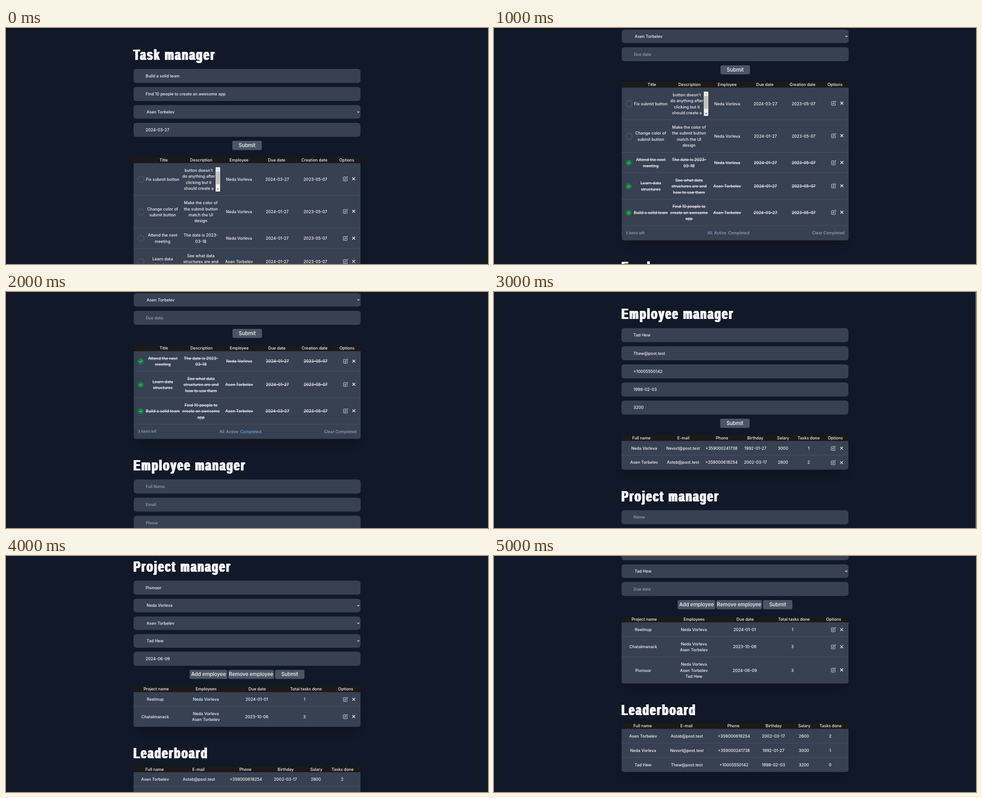
Recreate the animation shown at these times as an HTML page with a canvas. Size 1067 px wide and 525 px high, loop 6000 ms.

```html
<!DOCTYPE html>
<html lang="en">
<head>
<meta charset="utf-8">
<title>Task manager</title>
<style>
  html, body { margin: 0; width: 100%; height: 100%; overflow: hidden; background: #111827; }
  canvas { display: block; }
</style>
</head>
<body>
<canvas id="stage" width="1067" height="525"></canvas>
<script>
const ctx = document.getElementById('stage').getContext('2d');

const LEFT = 282.4, WIDTH = 502.4, LINE = 13.45;
const INK = '#f6f7f9', MUTED = '#9ca3af', PANEL = '#374151', RAISED = '#4b5563';

// ---- Content -------------------------------------------------------------

const NEDA = 'Neda Vorleva', ASEN = 'Asen Torbelev', TAD = 'Tad Hew';
const person = {
  neda: [NEDA, 'Nevorl@post.test', '+359000241738', '1992-01-27', '3000', '1'],
  asen: [ASEN, 'Astob@post.test', '+359000618254', '2002-03-17', '2600', '2'],
  tad: [TAD, 'Thew@post.test', '+10005550142', '1998-02-03', '3200', '0'],
};

const task = (title, text, who, due, extra) =>
  ({ cells: [title, text, who, due, '2023-05-07'], ...extra });
const row = (...cells) => ({ cells });

const openTasks = [
  task('Fix submit button', "button doesn't\ndo anything after\nclicking but it\nshould create a", NEDA, '2024-03-27', { scroll: true }),
  task('Change color of\nsubmit button', 'Make the color of\nthe submit button\nmatch the UI\ndesign', NEDA, '2024-01-27'),
];
const laterTasks = [
  task('Attend the next\nmeeting', 'The date is 2023-\n03-18', NEDA, '2024-01-27'),
  task('Learn data\nstructures', 'See what data\nstructures are and\nhow to use them', ASEN, '2024-01-27'),
  task('Build a solid team', 'Find 10 people to\ncreate an awesome\napp', ASEN, '2024-03-27'),
];
const doneTasks = laterTasks.map(t => ({ ...t, done: true }));

const projects = [
  row('Reelmup', NEDA, '2024-01-01', '1'),
  row('Chatalmanack', `${NEDA}\n${ASEN}`, '2023-10-06', '3'),
  row('Pixmoor', `${NEDA}\n${ASEN}\n${TAD}`, '2024-06-09', '3'),
];

// Columns: label, centre of the label, centre of the cells
const taskColumns = [['Title', 349, 346.7], ['Description', 432.3, 431.3], ['Employee', 515.8, 515.8],
  ['Due date', 599.2, 600.3], ['Creation date', 682.6, 684.9], ['Options', 754.4]];
const employeeColumns = [['Full name', 326.7, 332.7], ['E-mail', 419.5, 418.8], ['Phone', 505.2, 503.8],
  ['Birthday', 578.6, 579], ['Salary', 640.3, 640], ['Tasks done', 696.8, 696.8], ['Options', 756]];
const projectColumns = [['Project name', 332.5, 330.4], ['Employees', 443, 442.5], ['Due date', 556, 555],
  ['Total tasks done', 664, 660.6], ['Options', 752]];
const leaderColumns = [['Full name', 329, 330], ['E-mail', 426, 426.9], ['Phone', 530, 531],
  ['Birthday', 619, 618.6], ['Salary', 687, 686], ['Tasks done', 745, 744.2]];

const input = text => ({ text });
const hint = text => ({ text, hint: true });
const select = text => ({ text, select: true });

const submit = [['Submit', 501, 65.3]];
const projectButtons = [['Add employee', 406.5, 83.6], ['Remove employee', 492, 101.2], ['Submit', 595.6, 65]];

const taskSection = (fields, rows, filter) =>
  ({ title: 'Task manager', fields, buttons: submit, columns: taskColumns, rows, filter, checks: true });
const employeeSection = (fields, rows) =>
  ({ title: 'Employee manager', fields, buttons: submit, columns: employeeColumns, rows });
const projectSection = (fields, rows) =>
  ({ title: 'Project manager', fields, buttons: projectButtons, columns: projectColumns, rows });
const leaderboard = { title: 'Leaderboard', columns: leaderColumns,
  rows: [person.asen, person.neda, person.tad].map(p => row(...p)) };

const emptyTask = [hint('Title'), hint('Description'), select(ASEN), hint('Due date')];
const emptyEmployee = ['Full Name', 'Email', 'Phone', 'Birthday', 'Salary'].map(hint);
const team = [select(NEDA), select(ASEN), select(TAD)];

// top: where the first form starts on the stage
const scenes = [
  { top: 91, edge: 'top', sections: [taskSection(
      [input('Build a solid team'), input('Find 10 people to create an awesome app'), select(ASEN), input('2024-03-27')],
      [...openTasks, ...laterTasks], 'All')] },
  { top: -77.2, shift: .4, edge: 'top', sections: [
      taskSection(emptyTask, [...openTasks, ...doneTasks], 'All'), employeeSection(emptyEmployee, [])] },
  { top: -78.2, shift: .4, sections: [
      taskSection(emptyTask, doneTasks, 'Completed'), employeeSection(emptyEmployee, [])] },
  { top: 80.4, shift: -.3, edge: 'right', sections: [
      employeeSection(person.tad.slice(0, 5).map(input), [row(...person.neda), row(...person.asen)]),
      projectSection([hint('Name')], [])] },
  { top: 54.8, sections: [
      projectSection([input('Pixmoor'), ...team, input('2024-06-09')], projects.slice(0, 2)), leaderboard] },
  { top: -100.4, sections: [
      projectSection([hint('Name'), ...team, hint('Due date')], projects), leaderboard] },
];

// ---- Drawing -------------------------------------------------------------

function box(x, y, w, h, radius, color) {
  ctx.fillStyle = color;
  ctx.beginPath();
  ctx.roundRect(x, y, w, h, radius);
  ctx.fill();
}

function label(text, x, y, { align = 'center', color = INK, size = 8.96, strike = false } = {}) {
  ctx.font = `450 ${size}px Inter, sans-serif`;
  ctx.textAlign = align;
  ctx.fillStyle = color;
  ctx.fillText(text, x, y + size * .364);
  if (strike) {
    const w = ctx.measureText(text).width;
    ctx.fillRect(x - w / 2, y, w, .8);
  }
}

function paragraph(text, x, y, options) {
  const lines = text.split('\n');
  lines.forEach((line, i) => label(line, x, y + (i - (lines.length - 1) / 2) * LINE, options));
}

function strokePath(x, y, path, color = INK, width = 1) {
  ctx.save();
  ctx.translate(x, y);
  ctx.strokeStyle = color;
  ctx.lineWidth = width;
  ctx.stroke(new Path2D(path));
  ctx.restore();
}

// Narrow poster lettering, thickened sideways
function heading(text, baseline) {
  ctx.save();
  ctx.font = 'bold 34px "Liberation Sans", Arial, sans-serif';
  ctx.letterSpacing = '4.35px';
  ctx.textAlign = 'left';
  ctx.fillStyle = INK;
  for (const dx of [-1.4, -.7, 0, .7, 1.4]) {
    ctx.setTransform(.653, 0, 0, 1, 282.3 + dx, baseline);
    ctx.fillText(text, 0, 0);
  }
  ctx.restore();
}

function field({ text, hint, select }, y) {
  const h = select ? 30.2 : 31.2, middle = y + h / 2;
  box(LEFT, y, WIDTH, h, 6, PANEL);
  label(text, select ? 311.2 : 309, middle, { align: 'left', color: hint ? MUTED : INK });
  if (select) strokePath(779.8, middle, 'M-2.3-1.1 0 1.2 2.3-1.1', INK, 1.2);
  return y + h + 9.1;
}

function form({ fields, buttons }, y) {
  for (const f of fields) y = field(f, y);
  const middle = y + 10.1;
  for (const [text, x, w] of buttons) {
    box(x, middle - 10.2, w, 20.4, 3.5, RAISED);
    label(text, x + w / 2, middle, { size: 11.2 });
  }
  return middle + 26.3;
}

function checkbox(done, y) {
  ctx.beginPath();
  ctx.arc(done ? 297.8 : 298.6, y + .2, done ? 6.6 : 7, 0, 7);
  if (done) {
    ctx.fillStyle = '#15803d';
    ctx.fill();
    strokePath(297.8, y, 'M-2.6.2-.8 2 2.7-1.6', INK);
  } else {
    ctx.strokeStyle = '#5f6978';
    ctx.lineWidth = .9;
    ctx.stroke();
  }
}

function scrollbar(y) {
  box(464, y - 27, 10, 54, 0, '#f1f1f1');
  box(464.8, y - 17.5, 8.4, 28.5, 0, '#c1c1c1');
  for (const [dy, dir, color] of [[-21.7, -1, '#a3a3a3'], [21.7, 1, '#505050']]) {
    ctx.fillStyle = color;
    ctx.fill(new Path2D(`M466.8 ${y + dy - dir}h4.4l-2.2 ${2.4 * dir}z`));
  }
}

function options(y) {
  strokePath(751.4, y, 'M.8-3.8H-3.6Q-4.6-3.8-4.6-2.8V3.8Q-4.6 4.8-3.6 4.8H3Q4 4.8 4 3.8V.4M-1.8 2-1.2-.2 3.6-5 5.2-3.4.4 1.4Z', INK, .9);
  strokePath(769.6, y, 'M-3.1-3.1 3.1 3.1M3.1-3.1-3.1 3.1', INK, 1.4);
}

function footer(count, filter, y) {
  label(`${count} items left`, 291.5, y, { align: 'left', color: MUTED, size: 7.84 });
  for (const [text, x] of [['All', 477.5], ['Active', 500.4], ['Completed', 541.4]])
    label(text, x, y, { color: text === filter ? '#60a5fa' : MUTED });
  label('Clear Completed', 775.6, y, { align: 'right', color: MUTED });
}

function table({ columns, rows, filter, checks }, y) {
  const lineCount = r => Math.max(...r.cells.map(c => c.split('\n').length));
  const heights = rows.map(r => lineCount(r) * LINE + 18.5);
  const bodyTop = y + 13;
  const bodyHeight = heights.reduce((a, b) => a + b, filter ? 32.3 : 0);

  ctx.save();
  ctx.shadowColor = 'rgba(0,0,0,.25)';
  ctx.shadowBlur = 22;
  ctx.shadowOffsetY = 15;
  box(LEFT + 9, y + 9, WIDTH - 18, Math.max(0, bodyHeight - 5), 4, PANEL);
  ctx.restore();

  box(LEFT, bodyTop, WIDTH, bodyHeight, [0, 0, 5, 5], PANEL);
  box(LEFT, y, WIDTH, 13, [2, 2, 0, 0], '#1c1917');
  for (const [text, x] of columns) label(text, x, y + 6.5);

  y = bodyTop;
  rows.forEach((r, i) => {
    const middle = y + heights[i] / 2;
    if (checks) checkbox(r.done, middle);
    r.cells.forEach((text, c) => {
      const x = r.scroll && c === 1 ? 426.6 : columns[c][2];
      paragraph(text, x, middle, { strike: r.done });
    });
    if (r.scroll) scrollbar(middle);
    if (columns.at(-1)[0] === 'Options') options(middle + .8 - .55 * lineCount(r));
    y += heights[i];
    if (filter || i < rows.length - 1) box(LEFT, y - .9, WIDTH, .9, 0, RAISED);
  });
  if (filter) footer(rows.length, filter, y + 16.1);
  return bodyTop + bodyHeight;
}

function drawScene({ top, shift = 0, edge, sections }) {
  box(0, 0, 1067, 525, 0, '#111827');
  ctx.save();
  ctx.translate(shift, 0);
  let y = top;
  for (const section of sections) {
    heading(section.title, y - 20);
    const tableTop = section.fields ? form(section, y) : y - 2.4;
    y = table(section, tableTop) + 90.3;
  }
  ctx.restore();
  if (edge === 'top') box(0, 0, 1067, 1, 0, '#090c13');
  if (edge === 'right') box(1066, 0, 1, 525, 0, '#8a8f98');
}

// ---- Playback ------------------------------------------------------------

let shown = -1;
function play() {
  const index = Math.floor(performance.now() / 1000) % scenes.length;
  if (index !== shown) drawScene(scenes[shown = index]);
  requestAnimationFrame(play);
}
play();
</script>
</body>
</html>
```
